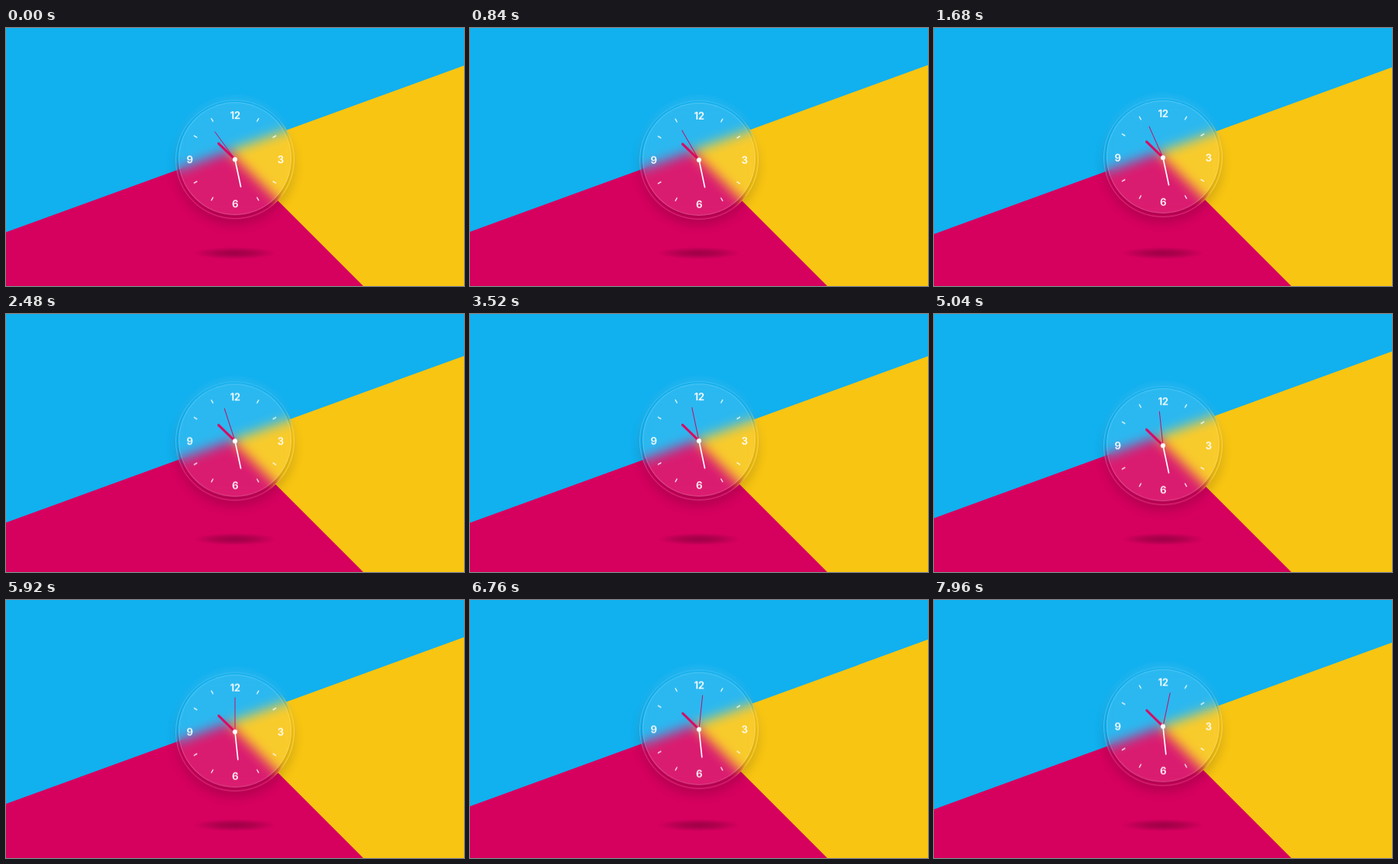
An HTML page that plays this animation: 600 by 338 pixels, repeating every 8000 ms.

```html
<!DOCTYPE html>
<html lang="en">
<head>
<meta charset="utf-8">
<title>Floating glass clock</title>
<style>
  html, body { margin: 0; width: 100%; height: 100%; overflow: hidden; background: #d6005f; }
  svg { position: absolute; left: 0; top: 0; display: block; }
  #shadow {
    position: absolute; left: 246px; top: 287px; width: 108px; height: 16px;
    background: radial-gradient(closest-side, rgba(0, 0, 0, .26), rgba(0, 0, 0, .18) 45%, transparent);
  }
  #clock {
    position: absolute; left: 222px; top: 95px; width: 156px; height: 156px;
    box-sizing: border-box; border-radius: 50%;
    border: 1px solid rgba(255, 255, 255, .22);
    backdrop-filter: blur(8px);
    box-shadow: 0 -5px 10px rgba(255, 255, 255, .08), 0 8px 14px rgba(0, 0, 0, .16);
  }
  #rim { position: absolute; inset: 0; border-radius: 50%; overflow: hidden; }
  #disc {
    position: absolute; left: 3px; top: 2px; width: 148px; height: 148px;
    box-sizing: border-box; border-radius: 50%;
    border: 1px solid rgba(255, 255, 255, .22);
    background: rgba(255, 255, 255, .11);
    box-shadow: 0 4px 5px rgba(0, 0, 0, .2);
  }
  #face { left: -1px; top: -1px; }
  #face text {
    font: 600 13.5px Inter, "Open Sans", sans-serif; letter-spacing: -.5px;
    fill: #fff; text-anchor: middle;
  }
</style>
</head>
<body>
<svg width="600" height="338">
  <path fill="#f8c512" d="M130 0L468 338H600V0Z"/>
  <path id="blue" fill="#11b0ef" d="M0 -20H600V48.3L0 266.7Z"/>
</svg>
<div id="shadow"></div>
<div id="clock">
  <div id="rim"><div id="disc"></div></div>
  <svg id="face" width="156" height="156" viewBox="-78 -78 156 156">
    <g id="marks" stroke="#fff" stroke-width="1.3"></g>
    <g id="numbers"></g>
    <g stroke-linecap="round">
      <path id="hour" d="M0 0V-30" stroke="#e0005f" stroke-width="3"/>
      <path id="minute" d="M0 0V-36.5" stroke="#fff" stroke-width="1.7"/>
      <path id="second" d="M0 0V-45" stroke="#d0005f" stroke-width=".9" stroke-linecap="butt"/>
    </g>
    <circle r="3.1" fill="#fff"/>
  </svg>
</div>
<script>
  const LOOP = 8000, FLOAT_PERIOD = 5000, FLOAT_START = 550, FLOAT_HEIGHT = 7.5;
  const TICK_OFFSET = 260, START_SECONDS = 10 * 3600 + 28 * 60 + 55;
  const byId = id => document.getElementById(id);

  for (let h = 1; h <= 12; h++) {
    const angle = h * Math.PI / 6;
    if (h % 3) {
      byId("marks").innerHTML += `<path d="M0 -57.2V-62.4" transform="rotate(${h * 30})"/>`;
    } else {
      const x = 59.5 * Math.sin(angle), y = 4.9 - 58 * Math.cos(angle);
      byId("numbers").innerHTML += `<text x="${x}" y="${y}">${h}</text>`;
    }
  }

  const turn = (id, degrees) => byId(id).setAttribute("transform", `rotate(${degrees})`);

  function draw(now) {
    const t = now % LOOP;
    const phase = 2 * Math.PI * (t - FLOAT_START) / FLOAT_PERIOD;
    const lift = FLOAT_HEIGHT * (1 - Math.cos(phase)) / 2;
    byId("clock").style.transform = `translateY(${-lift}px)`;
    byId("blue").setAttribute("transform", `translate(0 ${lift})`);

    const seconds = START_SECONDS + Math.floor((t - TICK_OFFSET) / 1000);
    const minutes = Math.floor(seconds / 60);
    turn("second", seconds % 60 * 6);
    turn("minute", minutes % 60 * 6);
    turn("hour", minutes / 2);
    requestAnimationFrame(() => draw(performance.now()));
  }
  draw(performance.now());
</script>
</body>
</html>
```
